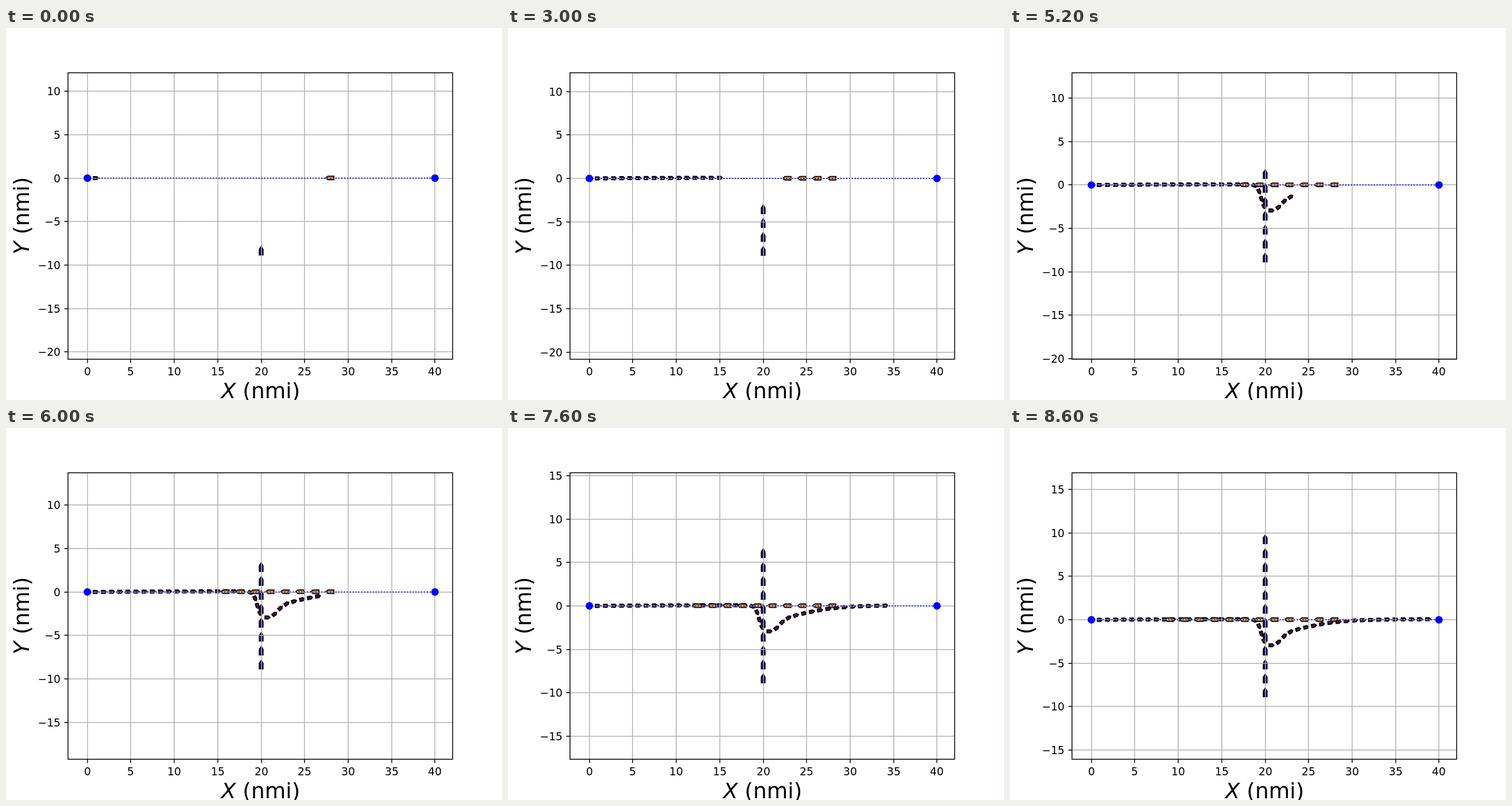
An HTML page that plays this animation: 864x648 px, repeating every 8.8 s.

```html
<!DOCTYPE html>
<html lang="en">
<head>
<meta charset="utf-8">
<title>Ship encounter</title>
<style>
html, body { margin: 0; width: 100%; height: 100%; overflow: hidden; background: #fff; }
svg { display: block; width: 864px; height: 648px; }
text { font: 18.75px "DejaVu Sans", sans-serif; fill: #000; }
.title { font-size: 37.5px; text-anchor: middle; }
.title tspan { font-style: italic; }
.ship { stroke: #000; stroke-width: 1.875; stroke-miterlimit: 10; }
.grid { stroke: #b0b0b0; stroke-width: 1.5; }
.axis { stroke: #000; stroke-width: 1.5; fill: none; }
</style>
</head>
<body>
<svg id="stage" viewBox="0 0 864 648"></svg>
<script>
const STEP = 200, STEPS = 44;
const LEFT = 108, RIGHT = 778, TOP = 78, BOTTOM = 577;
const X0 = 141.8, SCALE = 15.135;
const TARGET_EVERY = 3.9;

// Avoidance manoeuvre: x, y below the route, heading in degrees
const TURN = [
  [426.5, 1.2, 22], [434, 11.5, 66], [438, 24.5, 74], [443, 37.5, 62],
  [455.5, 44.4, 0], [468, 38.4, -38], [478, 28, -45], [489, 20.5, -35],
  [502, 16.3, -20], [516, 12.9, -14], [529.5, 10, -12], [543.5, 7.5, -10]
];
const TURN_START = 19, TURN_END = TURN_START + TURN.length;

const stage = document.getElementById("stage");

function add(parent, tag, attrs, text) {
  const node = document.createElementNS("http://www.w3.org/2000/svg", tag);
  for (const key in attrs) node.setAttribute(key, attrs[key]);
  if (text !== undefined) node.textContent = text;
  parent.appendChild(node);
  return node;
}

const line = (parent, cls, x1, y1, x2, y2) =>
  add(parent, "line", { class: cls, x1, y1, x2, y2 });

function ship(parent, x, y, heading, half, shoulder, width, fill) {
  const points = [[-half, -width], [shoulder, -width], [half, 0], [shoulder, width], [-half, width]];
  return add(parent, "polygon", {
    class: "ship", fill, points: points.join(" "),
    transform: `translate(${x} ${y}) rotate(${heading})`
  });
}

function ownPose(k) {
  if (k < TURN_START) return [156.5 + 14.18 * k, -1.2 * (1 - Math.exp(-k / 8)), 0];
  if (k < TURN_END) return TURN[k - TURN_START];
  const y = 8.7 * Math.exp(-(k - 30) / 3.2) - 1.2;
  return [558 + 14.2 * (k - TURN_END), y, -Math.max(0, y + 1)];
}

const targetCount = k => Math.floor(k / TARGET_EVERY + 1e-6);

// Screen height of the route; the view follows the northbound ship
function routeY(k) {
  const start = 261.5 + 0.6 * (1 - Math.exp(-k / 8));
  return Math.max(start, 285.6 + 12.13 * (targetCount(k) - 7));
}

const fleet = add(stage, "g", {});
const marks = [];
for (let k = 0; k < STEPS; k++) {
  const group = add(fleet, "g", {});
  ship(group, ...ownPose(k), 4.3, 1.6, 2.6, "#580858");
  const n = targetCount(k);
  if (k === 0 || n > targetCount(k - 1)) {
    ship(group, 564 - 26.1 * n, -0.3, 180, 7.2, 3.2, 3.1, "#ff8c00");
    ship(group, 444.5, 126.4 - 24.24 * n, -90, 7.5, 2.5, 3.2, "#00009c");
  }
  marks.push(group);
}

for (let v = 0; v <= 40; v += 5) {
  const x = Math.round(X0 + v * SCALE);
  line(stage, "grid", x, TOP, x, BOTTOM);
  line(stage, "axis", x, BOTTOM, x, BOTTOM + 6.5);
  add(stage, "text", { x, y: 605, "text-anchor": "middle" }, v);
}

const rows = [];
for (let v = -20; v <= 15; v += 5) {
  const group = add(stage, "g", {});
  line(group, "grid", LEFT, 0, RIGHT, 0);
  line(group, "axis", LEFT - 6.5, 0, LEFT, 0);
  add(group, "text", { x: 95, y: 7, "text-anchor": "end" }, v < 0 ? "\u2212" + -v : v);
  rows.push({ v, group });
}

const route = add(stage, "g", {});
const xEnd = X0 + 40 * SCALE;
add(route, "line", {
  x1: X0, y1: 0, x2: xEnd, y2: 0,
  stroke: "#00f", "stroke-width": 1.875, "stroke-dasharray": "1.875 3.094"
});
for (const cx of [X0, xEnd]) add(route, "circle", { cx, cy: 0, r: 6.55, fill: "#00f" });

add(stage, "rect", { class: "axis", x: LEFT, y: TOP, width: RIGHT - LEFT, height: BOTTOM - TOP });

function title(letter, transform) {
  const text = add(stage, "text", { class: "title", transform });
  add(text, "tspan", {}, letter);
  text.append(" (nmi)");
}
title("X", "translate(443.5 645)");
title("Y", "translate(39.5 327) rotate(-90)");

function draw(k) {
  const y0 = routeY(k);
  fleet.setAttribute("transform", `translate(0 ${y0})`);
  route.setAttribute("transform", `translate(0 ${y0})`);
  marks.forEach((group, i) => group.setAttribute("display", i <= k ? "inline" : "none"));
  for (const { v, group } of rows) {
    const y = y0 - v * SCALE;
    group.setAttribute("display", y > TOP && y < BOTTOM ? "inline" : "none");
    group.setAttribute("transform", `translate(0 ${Math.round(y)})`);
  }
}

let origin = null, shown = 0;
function tick(now) {
  if (origin === null) origin = now;
  const k = Math.floor(Math.max(0, now - origin) / STEP) % STEPS;
  if (k !== shown) draw(shown = k);
  requestAnimationFrame(tick);
}
draw(0);
requestAnimationFrame(tick);
</script>
</body>
</html>
```
